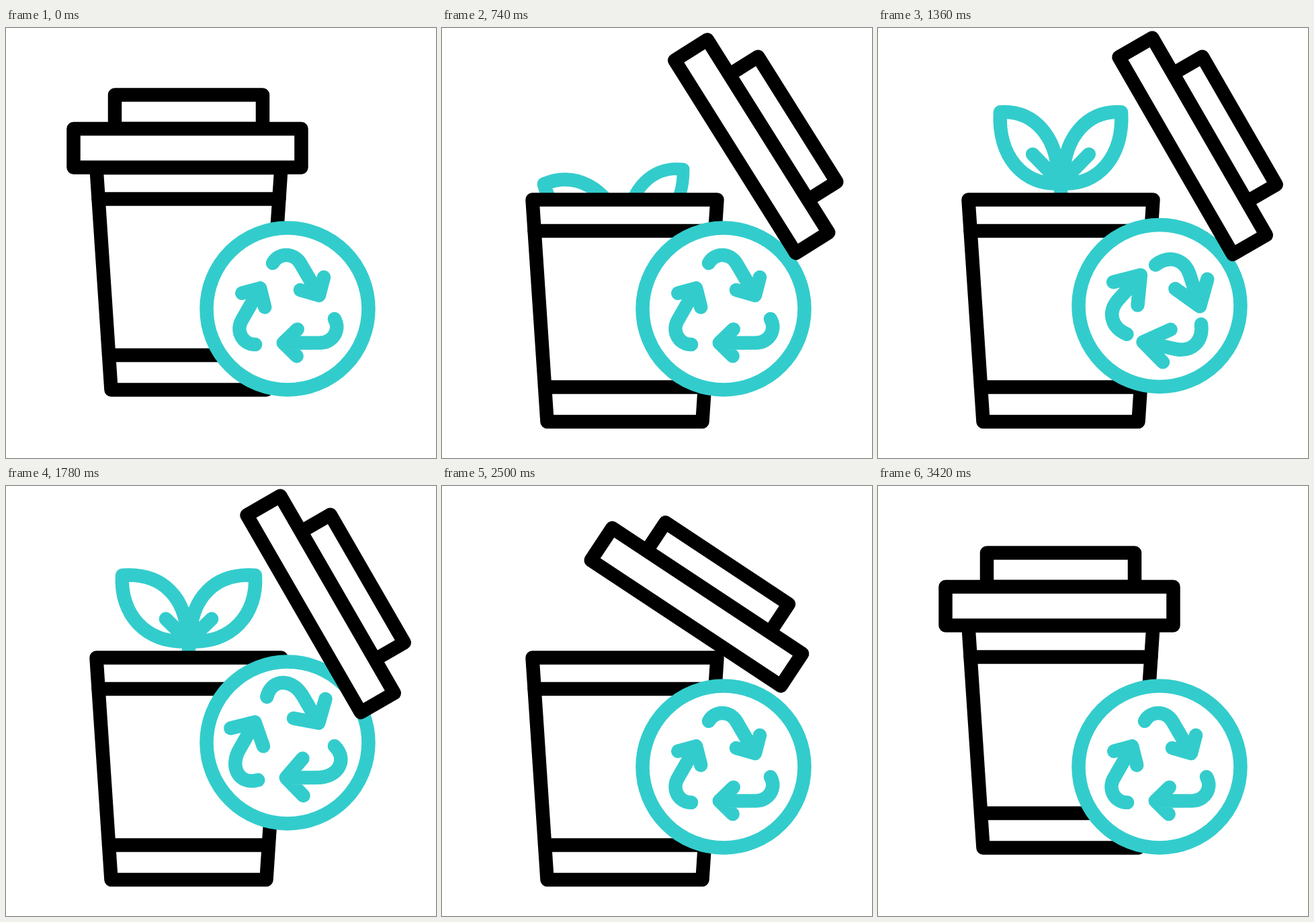
Recreate the animation shown at these times as an HTML page with a canvas. Size 640x640 px, loop 3.6 s.

```html
<!DOCTYPE html>
<html lang="en">
<head>
<meta charset="utf-8">
<title>Recyclable cup</title>
<style>
  html, body { margin: 0; width: 100%; height: 100%; overflow: hidden; background: #fff; }
  canvas { display: block; }
</style>
</head>
<body>
<canvas id="stage" width="640" height="640"></canvas>
<script>
const ctx = document.getElementById('stage').getContext('2d');
const LOOP = 3600, TEAL = '#33cccc', RAD = Math.PI / 180;

// Value at time t along [time, value, time, value, ...] with a sine ease between keys
function tween(t, ...keys) {
  if (t <= keys[0]) return keys[1];
  for (let i = 2; i < keys.length; i += 2) {
    if (t < keys[i]) {
      const u = (t - keys[i - 2]) / (keys[i] - keys[i - 2]);
      return keys[i - 1] + (keys[i + 1] - keys[i - 1]) * (1 - Math.cos(Math.PI * u)) / 2;
    }
  }
  return keys[keys.length - 1];
}

function shape(color, filled, draw) {
  ctx.beginPath();
  draw();
  if (filled) ctx.fill();
  ctx.strokeStyle = color;
  ctx.stroke();
}

function group(draw) {
  ctx.save();
  draw();
  ctx.restore();
}

function drawLeaf(side, sway, angle, scale) {
  group(() => {
    ctx.scale(side * scale, scale);
    ctx.rotate(angle * RAD);
    const x = 91 + 8 * sway, y = -105 + 7 * sway;
    shape(TEAL, false, () => {
      ctx.moveTo(0, 0);
      ctx.lineTo(4 - 2 * sway, -16 + 9 * sway);
      ctx.bezierCurveTo(7 - 3 * sway, -66 + 3 * sway, 37, -108 + 6 * sway, x, y);
      ctx.bezierCurveTo(95 + 8 * sway, -41, 57 + 7 * sway, 5, 0, 0);
      ctx.moveTo(0, 0);
      ctx.lineTo(41 - 7 * sway, -42 + 9 * sway);
    });
  });
}

function drawPlant(t) {
  const rise = tween(t, 500, 0, 1000, 1, 2110, 1, 2430, 0);
  if (!rise) return;
  const sway = tween(t, 1000, 0, 1270, -.2, 1820, 1, 2200, 0);
  group(() => {
    ctx.translate(272, 231 + 134 * (1 - rise));
    shape(TEAL, false, () => { ctx.moveTo(0, 0); ctx.lineTo(0, 40); });
    drawLeaf(-1, sway, 36 * (1 - rise), 1);
    drawLeaf(1, sway, 5 * (1 - rise), .83 + .17 * rise);
  });
}

function drawCup(t) {
  const drop = [0, 0, 480, 47.5, 2720, 47.5];
  const top = 208 + tween(t, ...drop, 2980, 0);
  const band = 254.5 + tween(t, ...drop, 3020, 1.7, 3420, 0);
  const bottom = 538.5 + tween(t, ...drop, 2980, -6.7, 3420, 0);
  shape('#000', true, () => {
    ctx.moveTo(134.5, top);
    ctx.lineTo(409.5, top);
    ctx.lineTo(387.5, bottom);
    ctx.lineTo(156.5, bottom);
    ctx.closePath();
  });
  for (const y of [band, bottom - 51.5]) {
    const inset = 22 * (y - top) / (bottom - top);
    shape('#000', false, () => {
      ctx.moveTo(134.5 + inset, y);
      ctx.lineTo(409.5 - inset, y);
    });
  }
}

// Tail, two curve handles, bend, tip, both barbs, then the group offset
const REST    = [-22, -68, -13, -84, 9, -84, 19, -68, 47, -20, 19, -28, 54, -47, 0, 0];
const WIND_UP = [-28, -58, -13.5, -79, 10, -80, 25, -60, 54, -20, 11, -33.5, 52, -62, 2.5, 3];
const SPIN    = [-20, -69, -9, -96, 22.5, -92, 34, -61, 51, -20, 15, -32, 66, -54, -1.5, -2.5];

function drawBadge(t) {
  const p = REST.map((v, i) => tween(t, 1226, v, 1360, WIND_UP[i], 1780, SPIN[i], 2161, v));
  group(() => {
    ctx.translate(419, 418 + tween(t, 1260, 0, 1710, -38.3, 2160, 0));
    shape(TEAL, true, () => ctx.arc(0, 0, 120.5, 0, 2 * Math.PI));
    ctx.translate(p[14], p[15]);
    ctx.rotate(tween(t, 1226, 0, 2161, 360) * RAD);
    for (let i = 0; i < 3; i++) {
      shape(TEAL, false, () => {
        ctx.moveTo(p[0], p[1]);
        ctx.bezierCurveTo(...p.slice(2, 8));
        ctx.lineTo(p[8], p[9]);
        ctx.moveTo(p[10], p[11]);
        ctx.lineTo(p[8], p[9]);
        ctx.lineTo(p[12], p[13]);
      });
      ctx.rotate(120 * RAD);
    }
  });
}

function drawLid(t) {
  const open = tween(t, 0, 0, 843, 1, 2258, 1, 2783, 0);
  group(() => {
    ctx.translate(270 + 220 * open, 153.5 + 9.7 * open);
    ctx.rotate(60 * open * RAD);
    shape('#000', true, () => ctx.rect(-108, -54, 220, 50.5));
    shape('#000', true, () => ctx.rect(-169.5, -3.5, 339, 57.5));
  });
}

function render(now) {
  const t = now % LOOP;
  ctx.fillStyle = '#fff';
  ctx.fillRect(0, 0, 640, 640);
  ctx.lineWidth = 20.5;
  ctx.lineCap = ctx.lineJoin = 'round';
  drawPlant(t);
  drawCup(t);
  drawBadge(t);
  drawLid(t);
}

const start = performance.now();
function loop() {
  render(performance.now() - start);
  requestAnimationFrame(loop);
}
loop();
</script>
</body>
</html>
```
